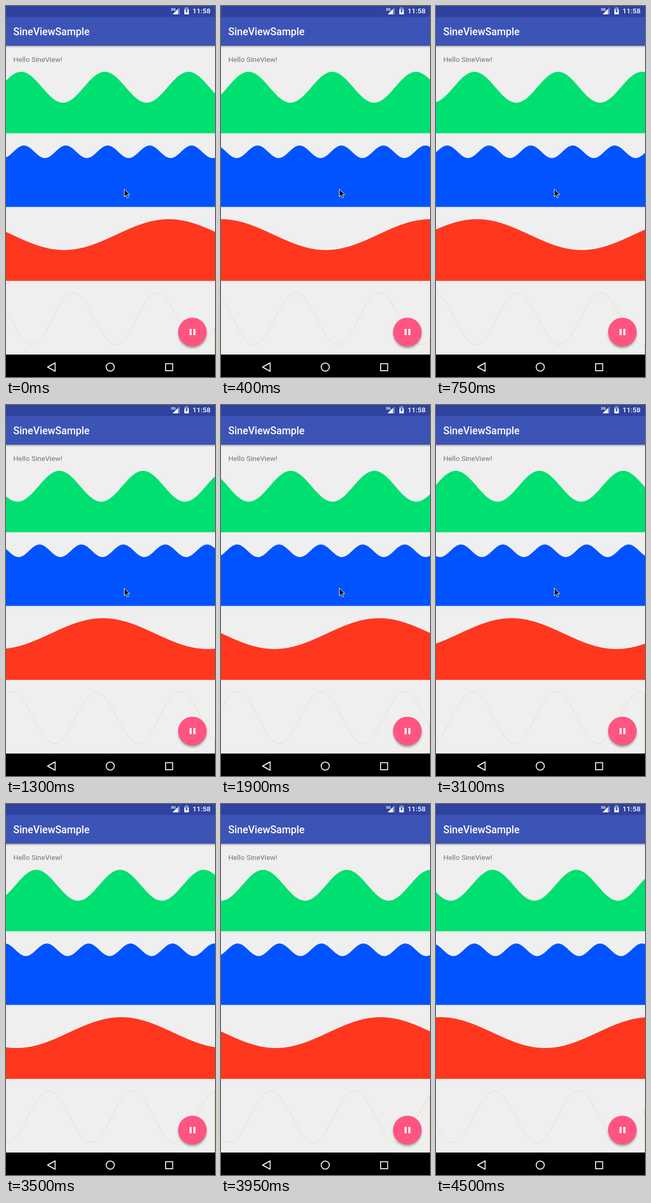
Recreate the animation shown at these times as an HTML page with a canvas. Size 402x710 px, loop 4.55 s.

```html
<!DOCTYPE html>
<html lang="en">
<head>
<meta charset="utf-8">
<title>SineViewSample</title>
<style>
  html, body { margin: 0; width: 100%; height: 100%; overflow: hidden; background: #efefef; }
  canvas, svg { position: absolute; left: 0; top: 0; width: 402px; height: 710px; }
  text { font-family: Roboto, sans-serif; fill: #fff; }
  .medium { font-weight: 500; }
</style>
</head>
<body>
<canvas id="stage" width="402" height="710"></canvas>
<svg viewBox="0 0 402 710">
  <defs>
    <linearGradient id="edge" x2="0" y2="1">
      <stop offset="0" stop-color="#000" stop-opacity=".3"/>
      <stop offset="1" stop-color="#000" stop-opacity="0"/>
    </linearGradient>
    <filter id="soft" x="-30%" y="-30%" width="160%" height="160%">
      <feGaussianBlur stdDeviation="2.3"/>
    </filter>
  </defs>

  <!-- App bar and status bar -->
  <rect y="76" width="402" height="4" fill="url(#edge)"/>
  <rect width="402" height="76" fill="#3d54b7"/>
  <rect width="402" height="21" fill="#2f429f"/>
  <text class="medium" x="14" y="56" font-size="19.55">SineViewSample</text>
  <text x="14" y="106.5" font-size="13.7" style="fill:#737373">Hello SineView!</text>
  <text class="medium" x="358.7" y="14.3" font-size="13.7">11:58</text>
  <text x="317" y="8.5" font-size="7.3" font-weight="700">3G</text>
  <g fill="#fff">
    <path d="M320.5 16L334 2.5V16z" opacity=".4"/>
    <path d="M320.5 16L330.5 6V16z"/>
    <path d="M345.5 2h3.5v1.5h2.5V16h-8.5V3.5h2.5z" opacity=".4"/>
    <path d="M343 7h8.5v9H343z"/>
    <path d="M348 5l-3.2 5.3h2V14l3.2-5.3h-2z" fill="#2f429f"/>
  </g>

  <!-- Floating button -->
  <circle cx="358.5" cy="627.5" r="27" opacity=".36" filter="url(#soft)"/>
  <circle cx="358.5" cy="624" r="27.5" fill="#ff5580"/>
  <path d="M353 618h4v12h-4zM360.300 618h4v12h-4z" fill="#fff"/>

  <!-- Navigation bar -->
  <rect y="667" width="402" height="43"/>
  <g fill="none" stroke="#e6e6e6" stroke-width="2">
    <path d="M80 691L94.500 683V699z" stroke-linejoin="round"/>
    <circle cx="200.5" cy="691" r="7.8"/>
    <rect x="307" y="684.500" width="13.500" height="13.500"/>
  </g>

  <path id="cursor" d="M227.500 350.500v14.500l3.300-3.100 2.300 5.300 2.500-1.100-2.300-5.100h4.600z" stroke="#fff"/>
</svg>
<script>
const LOOP = 4550, STEP = 50, CURSOR_HIDES = 3500;
const WIDTH = 402, BG = '#efefef';
const ctx = document.getElementById('stage').getContext('2d');
const cursor = document.getElementById('cursor');

// Uneven playback: [loop time, wave clock]
const CLOCK = [[0, 0], [750, 837], [1900, 1955], [2400, 2484], [3100, 3168], [3950, 3969], [4550, 4534]];

// crest: x of a crest at clock 0; period: ms per wavelength travelled
const WAVES = [
  { color: '#00e070', mid: 155.5, amp: 29.5, bottom: 243.5, length: 161, crest: 29, period: 3000 },
  { color: '#0053ff', mid: 279, amp: 12, bottom: 384.5, length: 80.6, crest: 34.5, period: 1000 },
  { color: '#ff371e', mid: 437.5, amp: 29.5, bottom: 526, length: 402.5, crest: 313, period: 2000 },
  { color: '#f3b75a', mid: 598.5, amp: 49.5, bottom: 668, length: 161, crest: 129.5, period: 5000, outline: true }
];

function waveClock(t) {
  const i = CLOCK.findIndex(([end]) => end > t);
  const [t0, c0] = CLOCK[i - 1], [t1, c1] = CLOCK[i];
  return c0 + (c1 - c0) * (t - t0) / (t1 - t0);
}

function drawWave(wave, clock) {
  const crest = wave.crest + wave.length * clock / wave.period;
  const height = x => wave.mid - wave.amp * Math.cos(2 * Math.PI * (x - crest) / wave.length);
  ctx.beginPath();
  for (let x = 0; x <= WIDTH; x++) ctx.lineTo(x, height(x));
  if (wave.outline) {
    ctx.strokeStyle = wave.color;
    ctx.lineWidth = 0.8;
    ctx.globalAlpha = 0.5;
    ctx.stroke();
    ctx.globalAlpha = 0.75;
    ctx.fillStyle = wave.color;
    ctx.fillRect(WIDTH - 1, height(WIDTH), 1, wave.bottom - height(WIDTH));
    ctx.globalAlpha = 1;
  } else {
    ctx.lineTo(WIDTH, wave.bottom);
    ctx.lineTo(0, wave.bottom);
    ctx.fillStyle = wave.color;
    ctx.fill();
  }
}

function render(now) {
  const t = Math.floor((now % LOOP) / STEP) * STEP;
  ctx.fillStyle = BG;
  ctx.fillRect(0, 0, WIDTH, 710);
  const clock = waveClock(t);
  WAVES.forEach(wave => drawWave(wave, clock));
  cursor.style.visibility = t < CURSOR_HIDES ? 'visible' : 'hidden';
}

const start = performance.now();
function tick() {
  render(performance.now() - start);
  requestAnimationFrame(tick);
}
tick();
</script>
</body>
</html>
```
